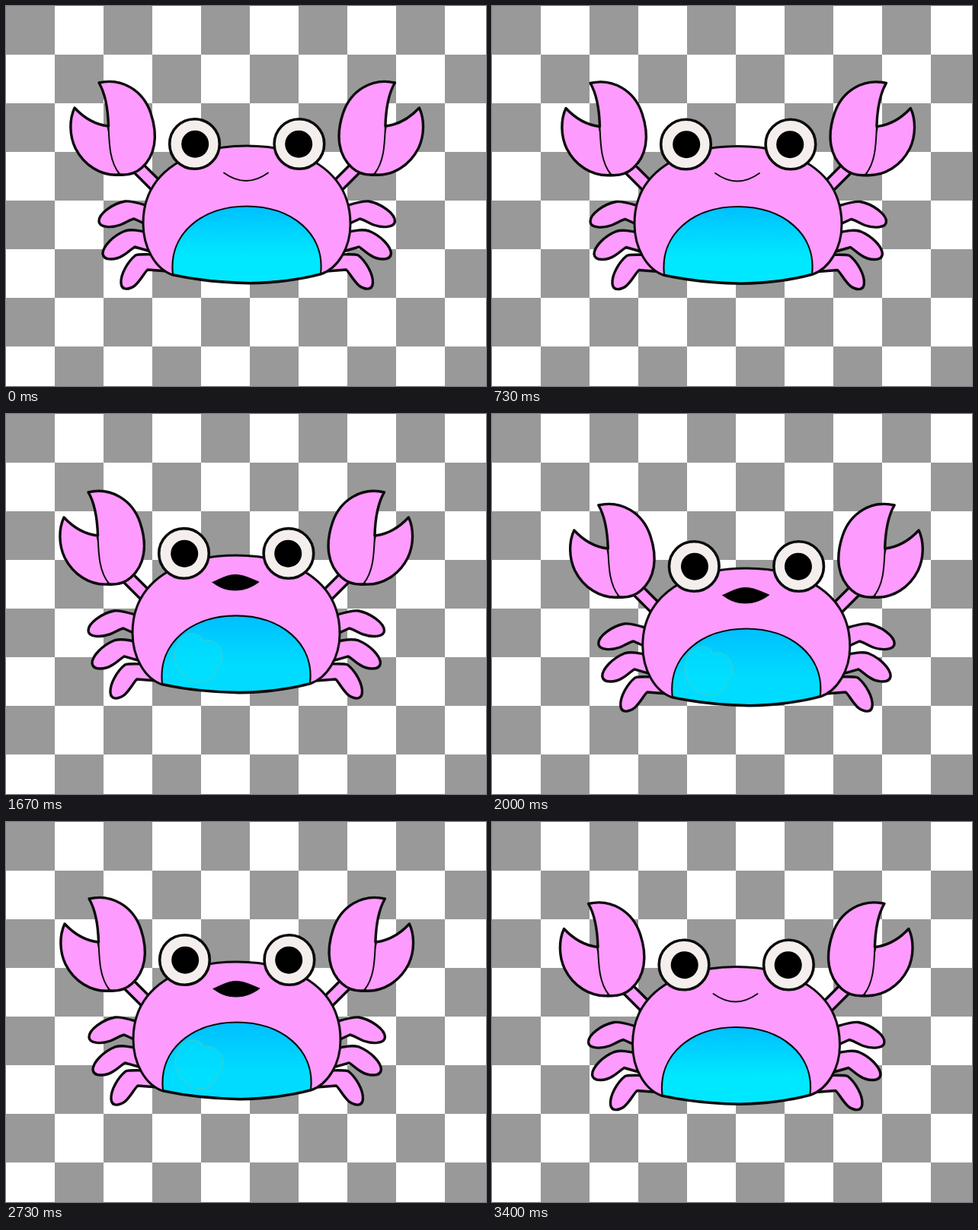
Recreate the animation shown at these times as an HTML page. Size 630x500 px, loop 3.47 s.

```html
<!DOCTYPE html>
<html lang="en">
<head>
<meta charset="utf-8">
<title>Crab</title>
<style>
  html, body { margin: 0; width: 100%; height: 100%; overflow: hidden; background: #fff; }
  svg { display: block; width: 630px; height: 500px; }
</style>
</head>
<body>
<svg viewBox="0 0 630 500">
  <defs>
    <pattern id="checker" width="128" height="128" patternUnits="userSpaceOnUse">
      <rect width="128" height="128" fill="#fff"/>
      <path d="M0 0H64V128H128V64H0Z" fill="#999" shape-rendering="crispEdges"/>
    </pattern>
    <linearGradient id="sea" gradientUnits="userSpaceOnUse" x1="0" y1="263" x2="0" y2="364">
      <stop offset="0" stop-color="#00bfff"/>
      <stop offset=".65" id="low"/>
    </linearGradient>
    <g id="limbs">
      <path d="M190 264C176 260 165 256 156 257C140 260 122 273 122 283C122 292 139 292 150 288C158 285 163 281 168 280L190 290"/>
      <path d="M190 299C177 296 166 293 156 296C141 302 127 316 127 326C128 336 145 334 154 328C161 324 165 319 169 317L190 323"/>
      <path d="M198 327C187 327 175 326 170 328C160 336 150 353 151 365C152 375 162 373 169 368C177 361 182 350 186 347L212 349"/>
      <path d="M167 218L195 246L207 235L180 208Z"/>
    </g>
    <g id="claw">
      <path d="M90 134C103 148 117 156 134 158L149 222C124 224 102 209 91 187C83 170 83 149 90 134Z"/>
      <path d="M122 101C152 94 180 111 190 141C200 171 196 197 178 213C168 222 157 223 149 221C136 205 135.5 182 134.5 158C134 142 132 118 122 101Z" stroke-width="2"/>
      <path d="M134.5 158C134 142 132 118 122 101C152 94 180 111 190 141C200 171 196 197 178 213C168 222 157 223 147 222" fill="none"/>
    </g>
    <g id="eye">
      <circle cx="247.5" cy="181.5" r="32.8" fill="#f4efed" stroke-width="3.6"/>
      <circle cx="248.2" cy="181.7" r="18" fill="#000" stroke="none"/>
    </g>
    <g id="side">
      <use href="#limbs"/>
    </g>
  </defs>
  <rect width="630" height="500" fill="url(#checker)"/>
  <g id="crab" fill="#fe9bfe" stroke="#0b0b0b" stroke-width="3.4" stroke-linejoin="round" stroke-linecap="round">
    <use href="#limbs"/>
    <use href="#limbs" class="flip"/>
    <path d="M316 184C244 184 180 216 180 286C180 318 196 346 219 354Q265 364 320 365Q372 364 413 353C436 345 452 318 452 287C452 216 388 184 316 184Z" stroke-width="3"/>
    <path d="M219 353C213 299 258 263.5 316 263.5C374 263.5 419 299 413 352Q372 363 320 364Q265 363 219 353Z" fill="url(#sea)" stroke-width="2.2"/>
    <use href="#claw"/>
    <use href="#claw" class="flip"/>
    <use href="#eye"/>
    <use href="#eye" class="flip"/>
    <path id="smile" d="M286 219.5Q315 240.5 344 219.5" fill="none" stroke-width="1.9"/>
    <g id="open">
      <path d="M285 219.5C297 214 305 209.5 315 209.5C325 209.5 334 214 346 219C338 225 328 230 315 230C302 230 294 226 285 219.5Z" fill="#000" stroke-width="1"/>
      <path d="M235 319C235 306 240 290 255 287C265 286 270 290 273 296C286 293 298 302 298 317C298 324 295 329 290 332C290 344 280 351 267 351C251 350 238 337 235 319Z" fill="#00e4ff" fill-opacity=".5" stroke="#5cc8b0" stroke-opacity=".75" stroke-width="1"/>
    </g>
  </g>
</svg>
<script>
  const LOOP = 3470, FPS = 15, OPEN_AT = 1270, CLOSE_AT = 3130;
  // turning points of the sway: time, x, y
  const turns = [
    [0, 0, 0], [400, 3, -1.5], [730, 7, .5], [1270, 6.5, 5],
    [1400, 27, 22], [1530, 3, -20.5], [1670, -14, 2], [2070, 29, 25],
    [2270, -2.5, -17.5], [2470, 20, -7], [2730, -13, 0],
    [2930, 2, -18.5], [3130, 7, 13], [3330, 4.5, 6.5], [LOOP, 4.5, 6.5]
  ];
  const $ = id => document.getElementById(id);
  const crab = $("crab"), smile = $("smile"), open = $("open"), low = $("low");
  const show = (el, on) => el.setAttribute("visibility", on ? "visible" : "hidden");
  const ease = u => (1 - Math.cos(Math.PI * u)) / 2;

  for (const el of document.querySelectorAll(".flip"))
    el.setAttribute("transform", "matrix(-1 0 0 1 632.4 0)");

  // the pose moves on two ticks of every three
  function stepTime(t) {
    const n = Math.floor((t + 5) * FPS / 1000);
    return (n && n % 3 === 0 ? n - 1 : n) * 1000 / FPS;
  }

  function sway(t) {
    const i = turns.findIndex(p => p[0] > t);
    const [t0, x0, y0] = turns[i - 1], [t1, x1, y1] = turns[i];
    const u = ease((t - t0) / (t1 - t0));
    return [x0 + (x1 - x0) * u, y0 + (y1 - y0) * u];
  }

  function draw(t) {
    const talking = t >= OPEN_AT - 5 && t < CLOSE_AT;
    crab.setAttribute("transform", `translate(${sway(stepTime(t))})`);
    show(smile, !talking);
    show(open, talking);
    low.setAttribute("stop-color", talking ? "#00dcff" : "#00e8ff");
  }

  let start;
  function tick(now) {
    start ??= now;
    draw((now - start) % LOOP);
    requestAnimationFrame(tick);
  }
  draw(0);
  requestAnimationFrame(tick);
</script>
</body>
</html>
```
